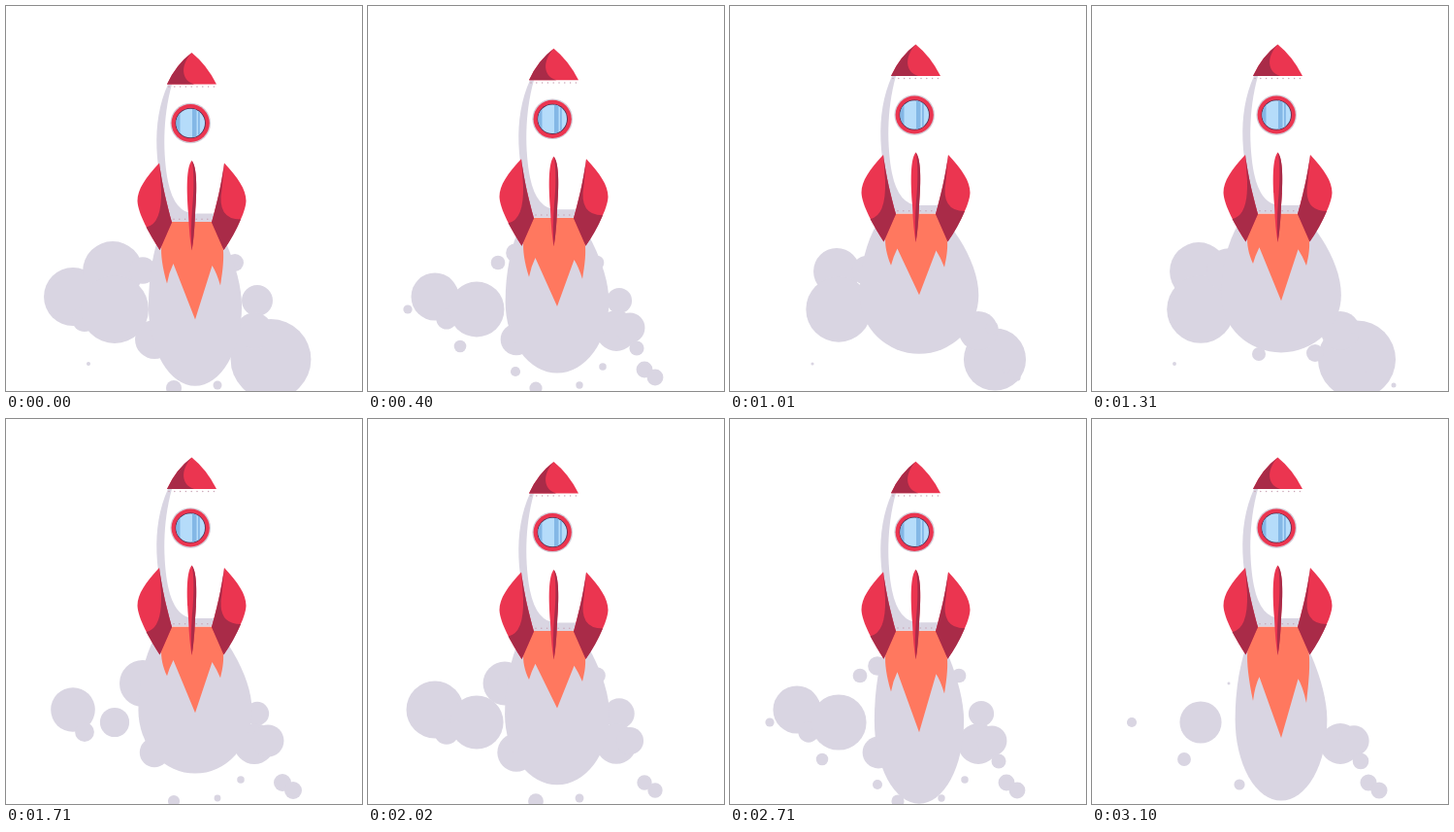
Recreate the animation shown at these times as an HTML page. Size 367 px wide and 396 px high, loop 3170 ms.

```html
<!DOCTYPE html>
<html lang="en">
<head>
<meta charset="utf-8">
<title>Rocket</title>
<style>
html, body { margin: 0; width: 100%; height: 100%; overflow: hidden; background: #fff; }
svg { display: block; width: 367px; height: 396px; }
.red { fill: #eb3550; }
.dark { fill: #a92b48; }
.smoke { fill: #d9d5e2; }
.flame { fill: #ff785f; }
.rivets { fill: none; stroke: #c9a3b4; stroke-width: 1.5; stroke-linecap: round; stroke-dasharray: 0 5.8; }
</style>
</head>
<body>
<svg viewBox="0 0 367 396">
  <defs><clipPath id="glass"><circle cx="190.2" cy="112" r="14.8"/></clipPath></defs>
  <g id="puffs" class="smoke"></g>
  <path id="plume" class="smoke"/>
  <g id="rocket">
    <path id="flame" class="flame"/>
    <path fill="#fff" d="M167 72H217C232 112 228 160 212.5 213.5H170.5C153 160 149 112 167 72Z"/>
    <path class="smoke" d="M167 72H171C161 108 162 145 167 172Q174 206 196 205H215L212.5 213.5H170.5C153 160 149 112 167 72Z"/>
    <path class="rivets" d="M168 74.6H216M173 210.8H211"/>
    <path class="red" d="M191.5 39.5Q175 52 166 72H217Q207 52 191.5 39.5Z"/>
    <path class="dark" d="M191.5 39.5Q175 52 166 72H194C181 68 179 53 191.5 39.5Z"/>
    <path class="red" d="M158 153C144 168 135.5 180 135.5 192C136 205 148 226 158.5 242.5L171 214C166 196 161 176 158 153Z"/>
    <path class="dark" d="M158 153C161 176 166 196 171 214L158.5 242.5Q151 231 144.500 219Q161 216 160 180Z"/>
    <path class="red" d="M225 153C239 168 247.5 180 247.5 192C247 205 235 226 224.5 242.5L212 214C217 196 222 176 225 153Z"/>
    <path class="dark" d="M225 153C222 176 217 196 212 214L224.5 242.5Q235 228 242 211Q217 211 222.5 180Z"/>
    <path class="red" d="M191.5 150.5C186 157 186 180 188 205Q189 230 191.5 243Q194 230 195 205C197 180 197 157 191.5 150.5Z"/>
    <path class="dark" d="M191.5 150.5C197 157 197 180 195 205Q194 230 191.5 243Q190 225 192 200C194 180 194 160 191.5 150.5Z"/>
    <circle cx="190.2" cy="112" r="20.8" fill="#d3cbd6"/>
    <circle cx="190.2" cy="112" r="19.6" class="red"/>
    <circle cx="190.2" cy="112" r="15.6" fill="#4d3152"/>
    <g clip-path="url(#glass)">
      <path fill="#b5dcfa" d="M170 92h40v40h-40z"/>
      <path fill="#83b7e6" d="M174 92h5.500v40h-5.500zM192 92h4.500v40h-4.500zM198 92h1.800v40h-1.800z"/>
    </g>
  </g>
</svg>
<script>
const LOOP = 3170, STEP = 77.6;
const CYCLE = 2330, HALF = CYCLE / 2;
const $ = id => document.getElementById(id);

function ease(p) {
  p = Math.min(1, Math.max(0, p));
  return p * p * (3 - 2 * p);
}

// Eased value between a few [time, value] points.
function at(keys, t) {
  return keys.reduce((v, [time, value], i) => {
    if (!i) return value;
    const [t0, v0] = keys[i - 1];
    return v + (value - v0) * ease((t - t0) / (time - t0));
  }, 0);
}

// Circles [x, y, r] that swell and shrink together around the moment `peak`.
const bursts = [];
function burst(peak, reach, period, circles) {
  const items = circles.map(([x, y, r]) => {
    const el = document.createElementNS("http://www.w3.org/2000/svg", "circle");
    el.setAttribute("cx", x);
    el.setAttribute("cy", y);
    $("puffs").append(el);
    return { el, r };
  });
  bursts.push({ peak, reach, period, items });
}

burst(-100, 850, CYCLE, [[69, 299, 30], [81, 322, 13], [153, 343, 20], [259, 303, 16], [236, 264, 9], [173, 393, 8], [218, 390, 4.5]]);
burst(40, 330, HALF, [[110, 273, 31], [273, 363.5, 41.5], [85, 368, 2]]);
burst(40, 600, HALF, [[112, 312, 35]]);
burst(1650, 900, CYCLE, [[141, 272, 24]]);
burst(HALF / 2, 1200, HALF, [[256, 334, 21]]);
burst(HALF / 2, 500, HALF, [[270, 331, 16.5], [285, 374, 9], [296, 382, 9]]);
burst(600, 400, CYCLE, [[277, 352, 9], [41, 312, 5.5], [152, 376, 6], [95, 350, 7.5]]);
burst(300, 300, CYCLE, [[152, 254, 10], [134, 264, 7.5]]);
burst(1310, 300, CYCLE, [[172, 358, 7], [230, 357, 9], [311, 390, 2.5]]);
burst(460, 200, HALF, [[242, 371, 4]]);

function drawPuffs(t) {
  for (const { peak, reach, period, items } of bursts) {
    const turns = (t - peak) / period;
    const u = Math.abs(turns - Math.round(turns)) * period / reach;
    const size = Math.max(0, 1 - u ** 3);
    for (const { el, r } of items) el.setAttribute("r", r * size);
  }
}

// The plume stretches down as it gets thinner; its right shoulder slopes.
function drawPlume(t) {
  const c = Math.cos(2 * Math.PI * (t + 370) / LOOP);
  const x = 195, rx = 54 - 8 * c, bottom = 376 + 20 * c;
  const y = 300 + (bottom - 365) / 3, top = 193;
  $("plume").setAttribute("d",
    `M${x - rx} ${y}A${rx} ${y - top} 0 0 1 ${x} ${top}` +
    `C${x + rx * 0.46} 215 ${x + rx} ${y - 38} ${x + rx} ${y}` +
    `A${rx} ${bottom - y} 0 0 1 ${x - rx} ${y}Z`);
}

const sideLength = [[0, 64], [1310, 52], [2330, 50], [3100, 77]];
const tipLength = [[0, 101], [780, 82], [1500, 92], [2330, 74], [2710, 105], [3100, 115]];

function drawFlame(t) {
  const base = 213, length = at(sideLength, t);
  const side = base + length, notch = base + length * 0.68, tip = base + at(tipLength, t);
  $("flame").setAttribute("d",
    `M171 ${base}C158 226 157 245 166 ${side}Q168 ${notch + 9} 172.5 ${notch}L195 ${tip}` +
    `L212.5 ${notch + 2}Q217 ${notch + 9} 221 ${side + 2}C227 245 225 226 212 ${base}Z`);
}

function drawRocket(t) {
  const p = t % CYCLE;
  const drop = 8.5 * (1 - ease(p / 770) + ease((p - 1710) / 580));
  $("rocket").setAttribute("transform", `translate(0 ${drop})`);
}

function draw(now) {
  const ms = now % LOOP;
  const t = ms < 146 ? 0 : 150 + STEP * Math.floor((ms - 146) / STEP);
  drawPuffs(t);
  drawPlume(t);
  drawFlame(t);
  drawRocket(t);
}

const start = performance.now();
function tick() {
  draw(performance.now() - start);
  requestAnimationFrame(tick);
}
tick();
</script>
</body>
</html>
```
